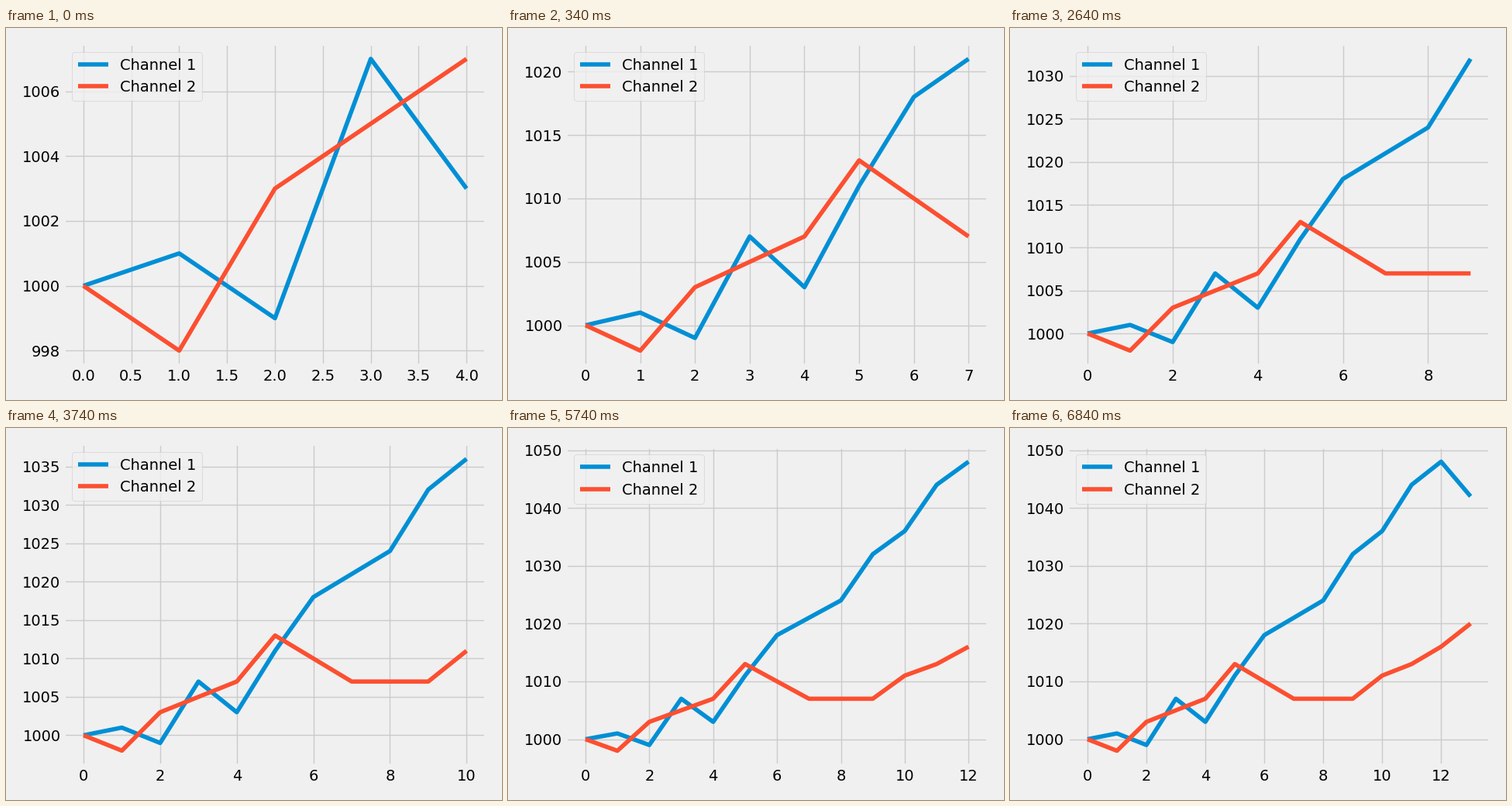
Animation of 640 by 480 pixels, one loop 6.94 s. Source, as a matplotlib script:

```python
import numpy as np
import matplotlib.pyplot as plt
from matplotlib.animation import FuncAnimation

LOOP_MS, STEP_MS = 6940, 20
START = 1000
FIRST_COUNT = 5


def walk(steps):
    """Running total of a channel, beginning at START."""
    return np.cumsum([START] + steps)


CHANNELS = {
    "Channel 1": walk([1, -2, 8, -4, 8, 7] + 2 * [3] + 2 * [8, 4] + [-6]),
    "Channel 2": walk([-2, 5] + 2 * [2] + [6] + 2 * [-3] + 2 * [0] + [4, 2, 3, 4]),
}

# A quick start, then about one new sample per second
ARRIVALS = np.cumsum([80, 180, 80, 1200] + 2 * [1100] + 2 * [1000] + [1100])

plt.style.use("fivethirtyeight")
fig, ax = plt.subplots(figsize=(6.4, 4.8), dpi=100)
shown = None


def plot_samples(count):
    ax.clear()
    for name, values in CHANNELS.items():
        ax.plot(np.arange(count), values[:count], label=name)
    ax.legend(loc="upper left")
    # Same starting margins each time, so the layout depends on count only
    fig.subplots_adjust(left=0.12, right=0.964, bottom=0.098, top=0.952)
    fig.tight_layout()


def update(frame):
    global shown
    arrived = np.searchsorted(ARRIVALS, frame * STEP_MS, side="right")
    count = FIRST_COUNT + int(arrived)
    if count != shown:
        plot_samples(count)
        shown = count
    return ax.lines


anim = FuncAnimation(fig, update, frames=LOOP_MS // STEP_MS,
                     interval=STEP_MS, repeat=True, repeat_delay=0)
plt.show()
```
